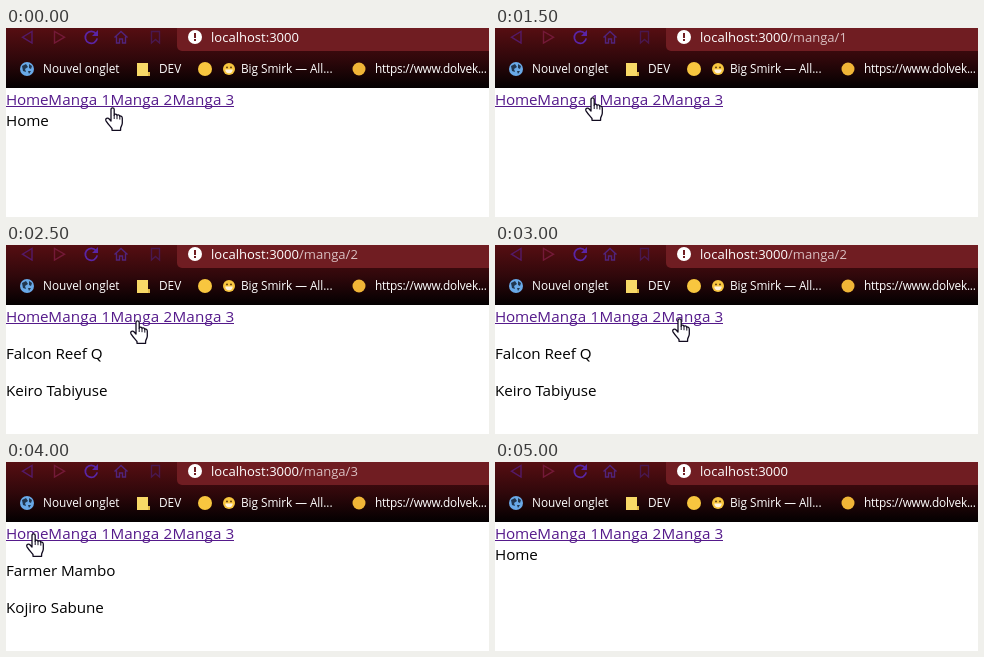
An HTML page with a canvas that plays this animation: 483 by 189 pixels, repeating every 5500 ms.

```html
<!DOCTYPE html>
<html lang="fr">
<head>
<meta charset="utf-8">
<title>Manga links</title>
<style>
  html, body { margin: 0; width: 100%; height: 100%; overflow: hidden; background: #fff; }
  canvas { display: block; width: 483px; height: 189px; }
</style>
</head>
<body>
<canvas id="stage"></canvas>
<script>
const W = 483, H = 189, STEP = 500;
const FONT = '"Open Sans", "Noto Sans", sans-serif';
const canvas = document.getElementById('stage');
const ctx = canvas.getContext('2d');
const dpr = window.devicePixelRatio || 1;
canvas.width = Math.round(W * dpr);
canvas.height = Math.round(H * dpr);

const pages = {
  home: { path: '', lines: [['Home', 98]] },
  loading: { path: '/manga/1', lines: [] },
  one: { path: '/manga/1', lines: [['Kelrun', 114], ['Tetsunori Migane', 151]] },
  two: { path: '/manga/2', lines: [['Falcon Reef Q', 114], ['Keiro Tabiyuse', 151]] },
  three: { path: '/manga/3', lines: [['Farmer Mambo', 114], ['Kojiro Sabune', 151]] }
};

// One entry per half second: page, pointer kind, pointer position
const steps = [
  ['home', 'hand', 99, 79],
  ['home', 'hand', 90, 70],
  ['home', 'hand', 90, 69],
  ['loading', 'hand', 90, 69],
  ['one', 'hand', 124, 75],
  ['two', 'hand', 124, 75],
  ['two', 'hand', 177, 73],
  ['three', 'hand', 177, 73],
  ['three', 'hand', 20, 71],
  ['home', 'beam', 37, 80],
  ['home', 'none', 0, 0]
];

const handShape = new Path2D(
  'M6 14V2.5C6 .2 9.2 .2 9.2 2.5V8.2C9.2 6.8 12 6.8 12 8.6C12 7.5 14.8 7.5 14.8 9.6' +
  'C14.8 8.6 17.3 8.6 17.3 11V16C17.3 18.5 15.6 19.5 15.6 21.5V23.3H7V21.5' +
  'C5 19 3 17 1 13.8C-.2 11.2 2.8 10.4 4.2 12Z');
const handLines = new Path2D('M9.2 8V12M12 8.6V12.2M14.8 9.6V12.6');

function text(str, x, y, size, color, spacing = 0) {
  ctx.font = `${size}px ${FONT}`;
  ctx.letterSpacing = spacing + 'px';
  ctx.fillStyle = color;
  ctx.fillText(str, x, y);
}

function disc(x, y, r, color) {
  ctx.fillStyle = color;
  ctx.beginPath();
  ctx.arc(x, y, r, 0, Math.PI * 2);
  ctx.fill();
}

function stroke(d, color, width = 1.4) {
  ctx.strokeStyle = color;
  ctx.lineWidth = width;
  ctx.stroke(new Path2D(d));
}

function fill(d, color) {
  ctx.fillStyle = color;
  ctx.fill(new Path2D(d));
}

function drawToolbar(path) {
  const g = ctx.createLinearGradient(0, 0, 0, 60);
  g.addColorStop(0, '#560e12');
  g.addColorStop(0.5, '#31080b');
  g.addColorStop(0.95, '#080102');
  g.addColorStop(1, '#040001');
  ctx.fillStyle = g;
  ctx.fillRect(0, 0, W, 60);

  ctx.fillStyle = '#701d22';
  ctx.beginPath();
  ctx.roundRect(171, -8, 340, 31, 5);
  ctx.fill();

  stroke('M26 3.5V15L16.5 9.2Z', '#541a68');
  stroke('M48.5 3.5V15L58.5 9.2Z', '#741a38');
  stroke('M90 5.6A6 6 0 1 0 91.2 10.4', '#5a25a6', 1.7);
  fill('M92 2V8H86Z', '#5a25a6');
  stroke('M108.5 9.5L115 3.5L121.5 9.5M110.5 8.5V15H113.5V11H116.5V15H119.5V8.5', '#51247c');
  stroke('M145.5 3.5H153.5V15L149.5 11.5L145.5 15Z', '#49184f');

  disc(189, 9, 7, '#fff');
  ctx.fillStyle = '#701d22';
  ctx.fillRect(188, 5, 2, 5);
  ctx.fillRect(188, 11, 2, 2);

  text('localhost:3000', 205, 14, 13.05, '#fff');
  text(path, 293, 14, 13.05, '#d9bfc1');
}

function drawBookmarks() {
  const label = (s, x, spacing) => text(s, x, 45, 11.8, '#fff', spacing);

  disc(21, 41, 7, '#69a9e8');
  fill('M16 38L20 36L22 39L19 41L20 44L17 43Z', '#21364f');
  fill('M23 36L26 38L25 41L23 40ZM22 43L25 43L23 46Z', '#21364f');
  label('Nouvel onglet', 37);

  fill('M131 35H142V44H144V48H131Z', '#f8d967');
  fill('M142 44H144V48H142Z', '#dfb748');
  label('DEV', 153);

  disc(199, 41, 7, '#f8c63f');

  disc(223, 41, 6, '#f8c63f');
  disc(221, 39.4, 0.9, '#54320d');
  disc(225, 39.4, 0.9, '#54320d');
  fill('M219.3 41.5H226.7A3.7 3.7 0 0 1 219.3 41.5Z', '#fff3dd');
  label('Big Smirk — All...', 235, -0.05);

  disc(353, 41, 6.5, '#f0b537');
  label('https://www.dolvek...', 369, -0.2);
}

function drawPage(lines) {
  const purple = '#551a8b';
  text('Home', 0, 77, 15.2, purple, -0.2);
  for (let i = 0; i < 3; i++) text('Manga ' + (i + 1), 42.3 + i * 62.1, 77, 15.2, purple, 0.15);
  ctx.fillStyle = purple;
  ctx.fillRect(0, 78, 228, 1);
  for (const [str, y] of lines) text(str, 0, y, 15.2, '#000', -0.05);
}

function drawPointer(kind, x, y) {
  ctx.save();
  ctx.translate(x, y);
  if (kind === 'hand') {
    ctx.fillStyle = '#fff';
    ctx.strokeStyle = '#120c20';
    ctx.lineJoin = 'round';
    ctx.lineWidth = 1.3;
    ctx.fill(handShape);
    ctx.stroke(handShape);
    ctx.lineWidth = 1;
    ctx.stroke(handLines);
  } else if (kind === 'beam') {
    stroke('M0 .5H3M4 .5H7M3.5 1V15M0 15.5H3M4 15.5H7', '#000', 1);
  }
  ctx.restore();
}

function frame(now) {
  const [name, kind, x, y] = steps[Math.floor(now / STEP) % steps.length];
  const page = pages[name];
  ctx.setTransform(dpr, 0, 0, dpr, 0, 0);
  ctx.fillStyle = '#fff';
  ctx.fillRect(0, 0, W, H);
  drawToolbar(page.path);
  drawBookmarks();
  drawPage(page.lines);
  drawPointer(kind, x, y);
}

const start = performance.now();
function loop() {
  frame(performance.now() - start);
  requestAnimationFrame(loop);
}
loop();
</script>
</body>
</html>
```
